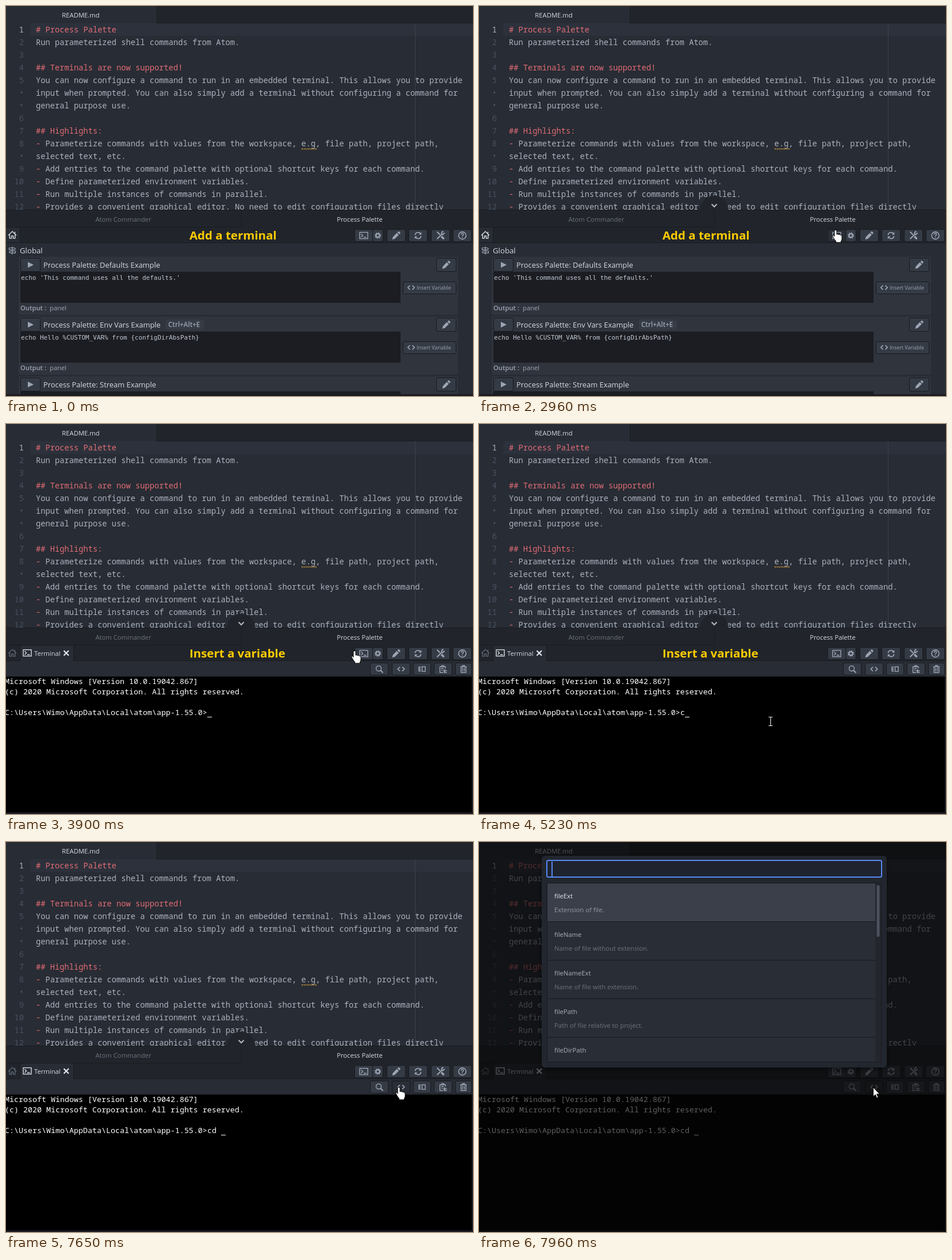
Recreate the animation shown at these times as an HTML page. Size 812 px wide and 678 px high, loop 8 s.

```html
<!DOCTYPE html>
<html lang="en">
<head>
<meta charset="utf-8">
<title>Process Palette</title>
<style>
html, body { margin: 0; width: 100%; height: 100%; overflow: hidden; background: #282c34; }
svg { display: block; width: 812px; height: 678px; }
text { font-family: "Open Sans", "Noto Sans", sans-serif; font-size: 11.25px; white-space: pre; }
.code { font-family: "Noto Sans Mono", "DejaVu Sans Mono", monospace; font-size: 13.745px; }
.cmd { font-family: "DejaVu Sans Mono", "Noto Sans Mono", monospace; font-size: 10.96px; }
.shell { font-family: "Noto Sans Mono", "DejaVu Sans Mono", monospace; font-size: 13.333px; font-weight: 500; }
.icon { fill: none; stroke: #9da5b4; stroke-width: 1.4; }
.icon .solid { fill: #9da5b4; stroke: none; }
</style>
</head>
<body>
<svg id="stage" viewBox="0 0 812 678"></svg>
<script>
const LOOP = 8000;
const C = {
  bg: '#282c34', bar: '#21252b', edge: '#181a1f', text: '#abb2bf', red: '#e06c75',
  dim: '#495162', ui: '#9da5b4', bright: '#d7dae0', btn: '#353b45', pressed: '#2a2e36'
};

const rect = (x, y, w, h, fill, extra = '') =>
  `<rect x="${x}" y="${y}" width="${w}" height="${h}" fill="${fill}" ${extra}/>`;
const text = (x, y, s, fill, extra = '') => `<text x="${x}" y="${y}" fill="${fill}" ${extra}>${s}</text>`;
const group = (id, body, extra = '') => `<g id="${id}" ${extra}>${body}</g>`;
const path = (d, extra = '') => `<path d="${d}" ${extra}/>`;

const icons = {
  term: rect(-7, -5.5, 14, 11, 'none') + path('M-4.5-3l3 3-3 3M0 3h4.5'),
  gear: '<circle r="3.1" stroke-width="2"/><circle r="4.6" stroke-width="1.8" stroke-dasharray="1.8 1.81"/>',
  pencil: path('M-7 7l1.2-4.6 6.8-6.8 3.4 3.4-6.8 6.8zM2-5.4l1.4-1.4q1-.8 1.9 0l1.5 1.5q.8 1 0 1.9l-1.4 1.4z', 'class="solid"'),
  refresh: path('M-5.2-.8A5.2 5.2 0 0 1 4-3.5M5.2.8A5.2 5.2 0 0 1-4 3.5', 'stroke-width="1.7"') +
    path('M5.8-6v4.6H1.2zM-5.8 6v-4.6h4.6z', 'class="solid"'),
  tools: path('M-6 6L3-3M-6-6.5l5 5', 'stroke-width="2"') + path('M1.5 1.5l4.5 4.5', 'stroke-width="3.4"') +
    path('M5-7.2Q1.4-6.5 2.2-3T7-4.6', 'stroke-width="2"'),
  help: '<circle r="6.4" stroke-width="1.6"/>' +
    path('M-2-1.6q0-2.1 2-2.1t2 1.8q0 1-1.2 1.7T0 1.4M0 2.6v1.5', 'stroke-width="1.5"'),
  search: '<circle cx="-1" cy="-1" r="4.5"/>' + path('M2.3 2.3l4.2 4.2', 'stroke-width="2"'),
  code: path('M-2-3.6l-3.7 3.6 3.7 3.6M2-3.6l3.7 3.6-3.7 3.6', 'stroke-width="1.7"'),
  panel: rect(0, -4, 5.5, 8, 'none') + path('M-2-3.5h-3.5v7h3.5M-3.5-1.5v3', 'stroke-width="1.6"'),
  paste: path('M0 6h-5.5v-10h9.5v3M-2.5-4v-1.8h4v1.8M-3-1h4M-3 2h2M6.5 3h-5.5M3.5.5l-2.5 2.5 2.5 2.5M1 6h5.5'),
  trash: path('M-5.5-4h11M-1.8-4v-2h3.6v2M-4.2-4v10h8.4v-10M-1.6-2v6M1.6-2v6'),
  play: path('M-4.5-5l10 5-10 5z', 'class="solid"'),
  home: path('M-7 .8L0-6 7 .8M-4.8-.5v6.3h3.3v-4h3v4h3.3v-6.3M4.5-5.5v3'),
  sign: path('M0-7v14M-5.5-4.5h9l2 1.7-2 1.7h-9zM5.5 1h-9l-2 1.7 2 1.7h9z', 'stroke-width="1.2"')
};
const icon = (name, x, y, extra = '') => `<g class="icon" transform="translate(${x} ${y})" ${extra}>${icons[name]}</g>`;

const button = (x, y, w, h, name, id = '') =>
  rect(x + .5, y + .5, w - 1, h - 1, C.btn, `rx="2.5" stroke="${C.edge}" ${id && `id="${id}"`}`) +
  (name ? icon(name, x + w / 2, y + h / 2) : '');

function editor() {
  const rows = [
    ['1', '# Process Palette', 1],
    ['2', 'Run parameterized shell commands from Atom.'],
    ['3', ''],
    ['4', '## Terminals are now supported!', 1],
    ['5', 'You can now configure a command to run in an embedded terminal. This allows you to provide'],
    ['•', 'input when prompted. You can also simply add a terminal without configuring a command for'],
    ['•', 'general purpose use.'],
    ['6', ''],
    ['7', '## Highlights:', 1],
    ['8', '- Parameterize commands with values from the workspace, e.g, file path, project path,'],
    ['•', 'selected text, etc.'],
    ['9', '- Add entries to the command palette with optional shortcut keys for each command.'],
    ['10', '- Define parameterized environment variables.'],
    ['11', '- Run multiple instances of commands in parallel.'],
    ['12', '- Provides a convenient graphical editor. No need to edit configuration files directly']
  ];
  const lines = rows.map(([num, s, head], i) => {
    const y = 46 + 22 * i;
    const body = s.replace(/^-/, `<tspan fill="${C.red}">-</tspan>`);
    return text(31, y, num, i ? C.dim : C.text, 'class="code" text-anchor="end"') +
      text(52, y, body, head ? C.red : C.text, 'class="code"');
  }).join('');
  return rect(0, 0, 812, 354, C.bg) +
    rect(262, 0, 550, 30, C.bar) + rect(262, 0, 1, 30, C.edge) + rect(262, 29, 550, 1, C.edge) +
    text(130, 20, 'README.md', C.bright, 'text-anchor="middle"') +
    rect(42, 30, 770, 22, '#2c313b') + rect(711, 30, 1, 324, '#3c4049') +
    `<g clip-path="url(#editClip)">${lines}</g>` +
    path('M514 248.5h26', 'stroke="#c8943f" stroke-width="2" stroke-dasharray="2 1.4"');
}

function dockBar() {
  const tools = [['pencil', 662], ['refresh', 700], ['tools', 739], ['help', 777]];
  return rect(0, 354, 812, 324, C.bar) + rect(0, 354, 812, 1, C.edge) +
    `<g clip-path="url(#editClip)">${group('handle',
      `<circle cx="409" cy="354" r="24.5" fill="${C.bar}"/>` +
      path('M404.5 344.5l4.5 4.5 4.5-4.5', 'fill="none" stroke="#b4bac5" stroke-width="2"'))}</g>` +
    rect(409, 355, 1, 30, C.edge) + rect(0, 384, 410, 1, C.edge) +
    text(204, 375, 'Atom Commander', '#6b717d', 'text-anchor="middle"') +
    text(615, 375, 'Process Palette', C.bright, 'text-anchor="middle"') +
    button(606, 388, 32, 22, 'term', 'termBtn') + button(637, 388, 19, 22, 'gear') +
    tools.map(([name, x]) => button(x, 388, 33, 22, name)).join('') +
    rect(0, 411, 812, 1, C.edge);
}

function command(y, name, line, keys) {
  const title = `Process Palette: ${name} Example`;
  return rect(22, y, 764, 101, '#30343d', 'rx="3"') +
    button(25, y + 2, 35, 24, 'play') + text(65, y + 19, title, C.bright, 'style="font-size:12.9px"') +
    (keys ? rect(278, y + 5, 66, 18, '#363b45', 'rx="3"') +
      text(282, y + 18, keys, C.ui, 'font-weight="600" style="font-size:11.6px"') : '') +
    button(748, y + 2, 35, 24, 'pencil') +
    rect(25, y + 26, 661, 54, '#1b1d23') + text(26, y + 40, line, '#c3c8d1', 'class="cmd"') +
    button(690, y + 43, 93, 22) + icon('code', 704.5, y + 53.5) +
    text(714, y + 57, 'Insert Variable', C.ui, 'style="font-size:8.9px"') +
    text(25, y + 93, 'Output :', C.ui, 'font-weight="600"') + text(76, y + 93, 'panel', C.ui);
}

const globalView = () =>
  rect(0, 385, 24, 26, C.bg) + rect(24, 385, 1, 26, C.edge) +
  icon('home', 11, 398, 'style="stroke:#d7dae0"') +
  rect(0, 412, 812, 263, C.bg) + icon('sign', 11, 425) +
  text(24, 430, 'Global', C.bright, 'style="font-size:13.2px"') +
  command(436, 'Defaults', "echo 'This command uses all the defaults.'") +
  command(540, 'Env Vars', 'echo Hello %CUSTOM_VAR% from {configDirAbsPath}', 'Ctrl+Alt+E') +
  command(644, 'Stream', '');

function termView() {
  const tools = [['search', 633, 32], ['code', 671, 32], ['panel', 708, 31], ['paste', 744, 32], ['trash', 781, 29]];
  const out = (y, s) => text(-2, y, s, '#fff', 'class="shell"');
  return icon('home', 11, 398, 'style="stroke:#5d6470"') + rect(24, 385, 1, 26, C.edge) +
    rect(25, 385, 92, 27, C.bg) + rect(117, 385, 1, 26, C.edge) +
    icon('term', 37, 398, 'style="stroke:#d7dae0"') + text(49, 403, 'Terminal', C.bright) +
    path('M100.5 394l8.5 8.5m0-8.5l-8.5 8.5', 'stroke="#e4e7ec" stroke-width="2.2"') +
    rect(0, 412, 812, 27, C.bg) +
    tools.map(([name, x, w]) => button(x, 415, w, 22, name, name + 'Btn')).join('') +
    rect(0, 439, 810, 236, '#000') +
    out(452, 'Microsoft Windows [Version 10.0.19042.867]') +
    out(470, '(c) 2020 Microsoft Corporation. All rights reserved.') +
    out(506, 'C:\\Users\\Wimo\\AppData\\Local\\atom\\app-1.55.0&gt;') +
    text(350, 506, '', '#fff', 'id="typed" class="shell"') + rect(350, 509, 8, 1, '#fff', 'id="caret"');
}

function popup() {
  const items = [
    ['fileExt', 'Extension of file.'],
    ['fileName', 'Name of file without extension.'],
    ['fileNameExt', 'Name of file with extension.'],
    ['filePath', 'Path of file relative to project.'],
    ['fileDirPath', 'Path of file directory in the project.']
  ];
  const list = items.map(([name, desc], i) => {
    const y = 72 + 67 * i;
    return rect(119, y, 570, 66, i ? '#292d35' : '#3a3f4a') + rect(119, y + 66, 570, 1, C.edge) +
      text(131, y + 26, name, i ? '#a9b1be' : '#e4e7ec') + text(131, y + 50, desc, i ? '#6c7380' : '#949ba8');
  }).join('');
  return rect(109, 24, 600, 368, '#24272d', 'rx="6" filter="url(#shadow)"') +
    rect(118, 32, 582, 29, '#1f2330', 'rx="2.5" stroke="#568af2" stroke-width="2"') +
    rect(126, 34, 2, 26, '#568af2') +
    rect(118, 71, 582, 312, C.edge) + rect(689, 72, 10, 310, '#23262d') +
    `<g clip-path="url(#listClip)">${list}</g>` + rect(691.5, 75, 5, 90, '#4b515d', 'rx="2.5"');
}

const pointer = 'fill="#fff" stroke="#000" stroke-linejoin="round"';
const cursors =
  path('M.5.5v16.2l3.7-3.5 2.6 6 2.4-1-2.6-6h5z', `id="arrow" ${pointer}`) +
  path('M-4 2.2a2 2 0 0 1 4 0V8q1.8-1.2 3.2.4 1.8-.8 2.9.7 2.9-.6 2.9 2v5q0 2-1.5 3.5V22h-9v-2.4q-2-1.8-3.5-4.6l-2-3.6q-.8-2.3 1-2.2 1 .1 2 2.2z', `id="hand" ${pointer}`) +
  path('M-3.5-7.5h3l.5.5.5-.5h3M0-7v14M-3.5 7.5h3L0 7l.5.5h3', 'id="beam" fill="none" stroke="#fff" stroke-width="1.1"');

const stage = document.getElementById('stage');
stage.innerHTML = `<defs>
  <clipPath id="editClip"><rect y="30" width="812" height="325"/></clipPath>
  <clipPath id="listClip"><rect x="119" y="72" width="570" height="310"/></clipPath>
  <filter id="shadow" x="-10%" y="-10%" width="120%" height="120%">
    <feDropShadow dx="0" dy="3" stdDeviation="5" flood-color="#000" flood-opacity=".5"/></filter>
  </defs>` + editor() + dockBar() + group('global', globalView()) + group('term', termView()) +
  rect(0, 675, 812, 3, '#1a1b20') +
  text(319, 406, '', '#ffcc00', 'id="caption" font-weight="700" style="font-size:20.45px"') +
  rect(0, 0, 812, 678, '#050606', 'id="shade"') + group('popup', popup()) + group('mouse', cursors);

const ui = {};
stage.querySelectorAll('[id]').forEach(e => ui[e.id] = e);
const show = (e, on) => e.setAttribute('display', on ? 'inline' : 'none');

// Pointer moves: start, end, number of steps, then from / control / to points.
const moves = [
  [770, 1070, 5, [812, 400], [700, 428], [608, 447]],
  [2250, 2560, 5, [608, 447], [612, 415], [622, 389]],
  [3430, 3590, 3, [622, 389], [642, 362], [664, 342]],
  [3740, 4210, 7, [664, 342], [600, 400], [528, 471]],
  [4440, 4760, 5, [528, 471], [480, 530], [507, 517]],
  [6630, 7250, 9, [507, 517], [760, 412], [685, 426]]
];

const stepped = (t, start, end, n) =>
  Math.max(0, Math.min(1, (Math.floor((t - start) / ((end - start) / (n - 1)) + 1e-6) + 1) / n));

function mouseAt(t) {
  const move = moves.filter(m => t >= m[0]).pop();
  if (!move) return null;
  const [start, end, n, a, b, c] = move;
  const u = stepped(t, start, end, n), v = 1 - u;
  return [0, 1].map(i => Math.round(v * v * a[i] + 2 * u * v * b[i] + u * u * c[i]));
}

function cursorKind(x, y, inTerm, modal) {
  if (modal) return 'arrow';
  if (x > 606 && y >= 388 && y < 410) return 'hand';
  if (inTerm && x > 633 && y >= 415 && y < 437) return 'hand';
  return inTerm && y >= 439 ? 'beam' : 'arrow';
}

function draw(t) {
  const inTerm = t >= 3030, modal = t >= 7720;
  show(ui.global, !inTerm);
  show(ui.term, inTerm);
  ui.caption.textContent = t < 3030 ? 'Add a terminal' : t < 7570 ? 'Insert a variable' : '';

  const rise = stepped(t, 770, 1070, 5);
  show(ui.handle, rise > 0);
  ui.handle.setAttribute('transform', `translate(0 ${25 * (1 - rise)})`);

  const typed = 'cd '.slice(0, [5230, 5620, 6080].filter(k => t >= k).length);
  ui.typed.textContent = typed;
  ui.caret.setAttribute('x', 350 + 8 * typed.length);
  show(ui.caret, t >= 3430);

  ui.termBtn.setAttribute('fill', t >= 2880 && t < 3430 ? C.pressed : C.btn);
  ui.codeBtn.setAttribute('fill', t >= 7570 ? C.pressed : C.btn);

  const fade = stepped(t, 7720, 7960, 4);
  show(ui.shade, modal);
  show(ui.popup, modal);
  ui.shade.setAttribute('opacity', .64 * (1 - (1 - fade) ** 3));

  const pos = mouseAt(t);
  show(ui.mouse, pos);
  if (!pos) return;
  ui.mouse.setAttribute('transform', `translate(${pos})`);
  const kind = cursorKind(...pos, inTerm, modal);
  for (const k of ['arrow', 'hand', 'beam']) show(ui[k], k === kind);
}

const began = performance.now();
function tick() {
  draw((performance.now() - began) % LOOP);
  requestAnimationFrame(tick);
}
tick();
</script>
</body>
</html>
```
